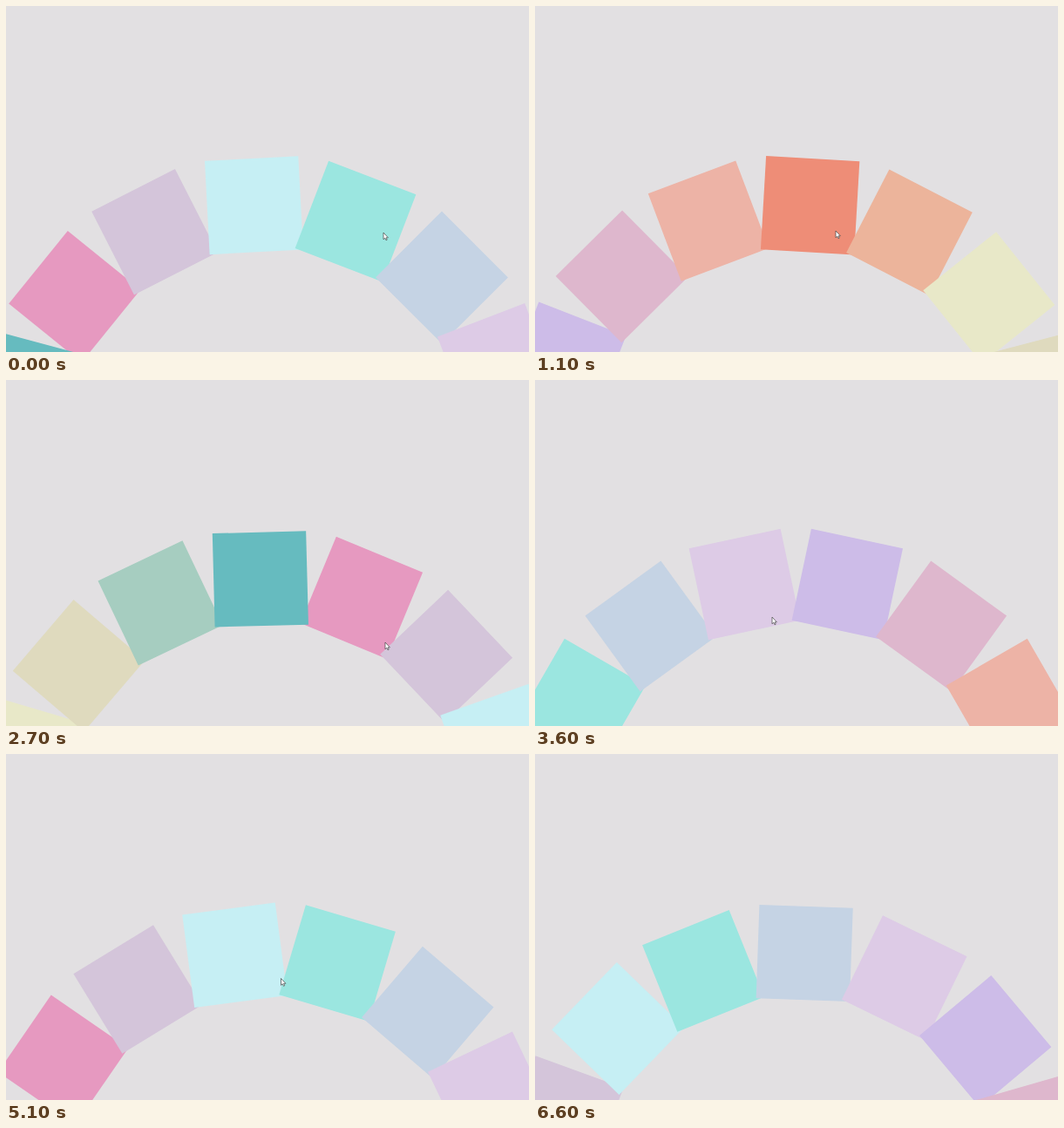
These frames come from a looping animation (600x397 px, 6.8 s). An HTML page:

```html
<!DOCTYPE html>
<html lang="en">
<head>
<meta charset="utf-8">
<title>Colour wheel</title>
<style>
  html, body { margin: 0; width: 100%; height: 100%; overflow: hidden; background: #e2e0e2; }
  svg { display: block; width: 600px; height: 397px; }
</style>
</head>
<body>
<svg viewBox="0 0 600 397">
  <g id="wheel"></g>
  <path id="cursor" d="M0 0V7.8L1.8 6.2L3 8.8L4.2 8.2L3.1 5.8H5.4Z"
        fill="#fff" stroke="#444" stroke-width=".7" stroke-linejoin="round"/>
</svg>
<script>
const LOOP = 6800, STEP = 100;
const CENTER = "299.3 512.1", RADIUS = 283.8, SIDE = 107.4;
const COLORS = [
  "#e699c0", "#d4c5da", "#c6eff4", "#9be6e0", "#c5d3e4",
  "#ddcbe6", "#cdbce8", "#deb7cd", "#edb3a6", "#ee8d77",
  "#ecb49b", "#e8e8c8", "#dfdabe", "#a6cdc0", "#66bbbf"
];

// key poses; the wheel rests wherever two neighbours share an angle
const POSES = [
  { t: 0, angle: -51, x: 433, y: 260 },
  { t: 700, angle: 116, x: 306, y: 262 },
  { t: 800, angle: 116, x: 302, y: 261 },
  { t: 1100, angle: 147.3, x: 345, y: 258 },
  { t: 2700, angle: 382.5, x: 435, y: 301 },
  { t: 3600, angle: 588, x: 272, y: 272 },
  { t: 4300, angle: 634.6, x: 337, y: 296 },
  { t: 4600, angle: 640, x: 310, y: 285 },
  { t: 4800, angle: 640, x: 300, y: 280 },
  { t: 5800, angle: 817.1, x: 431, y: 178 },
  { t: 6200, angle: 930, x: 612, y: 148 },
  { t: 6600, angle: 986, x: 612, y: 148 },
  { t: LOOP, angle: 986, x: 612, y: 148 }
];

const wheel = document.getElementById("wheel");
const cursor = document.getElementById("cursor");

COLORS.forEach((color, i) => {
  const card = document.createElementNS("http://www.w3.org/2000/svg", "rect");
  const attrs = {
    x: -SIDE / 2, y: -RADIUS - SIDE / 2, width: SIDE, height: SIDE,
    fill: color, transform: `rotate(${i * 360 / COLORS.length})`
  };
  for (const key in attrs) card.setAttribute(key, attrs[key]);
  wheel.append(card);
});

// average speed between pose i and the next one, clamped at the ends
function speed(key, i) {
  const n = Math.min(Math.max(i, 0), POSES.length - 2);
  const a = POSES[n], b = POSES[n + 1];
  return (b[key] - a[key]) / (b.t - a.t);
}

// harmonic mean keeps the curve free of overshoot
function slope(key, i) {
  const u = speed(key, i - 1), v = speed(key, i);
  return u * v > 0 ? 2 * u * v / (u + v) : 0;
}

function valueAt(key, t) {
  const i = POSES.findIndex(pose => pose.t > t) - 1;
  const a = POSES[i], b = POSES[i + 1];
  const dt = b.t - a.t, p = (t - a.t) / dt, q = 1 - p;
  return q * q * (1 + 2 * p) * a[key] + p * p * (3 - 2 * p) * b[key]
    + p * q * dt * (q * slope(key, i) - p * slope(key, i + 1));
}

function draw() {
  const t = Math.floor(performance.now() % LOOP / STEP) * STEP;
  wheel.setAttribute("transform", `translate(${CENTER}) rotate(${valueAt("angle", t)})`);
  cursor.setAttribute("transform", `translate(${valueAt("x", t)} ${valueAt("y", t)})`);
  requestAnimationFrame(draw);
}
draw();
</script>
</body>
</html>
```
